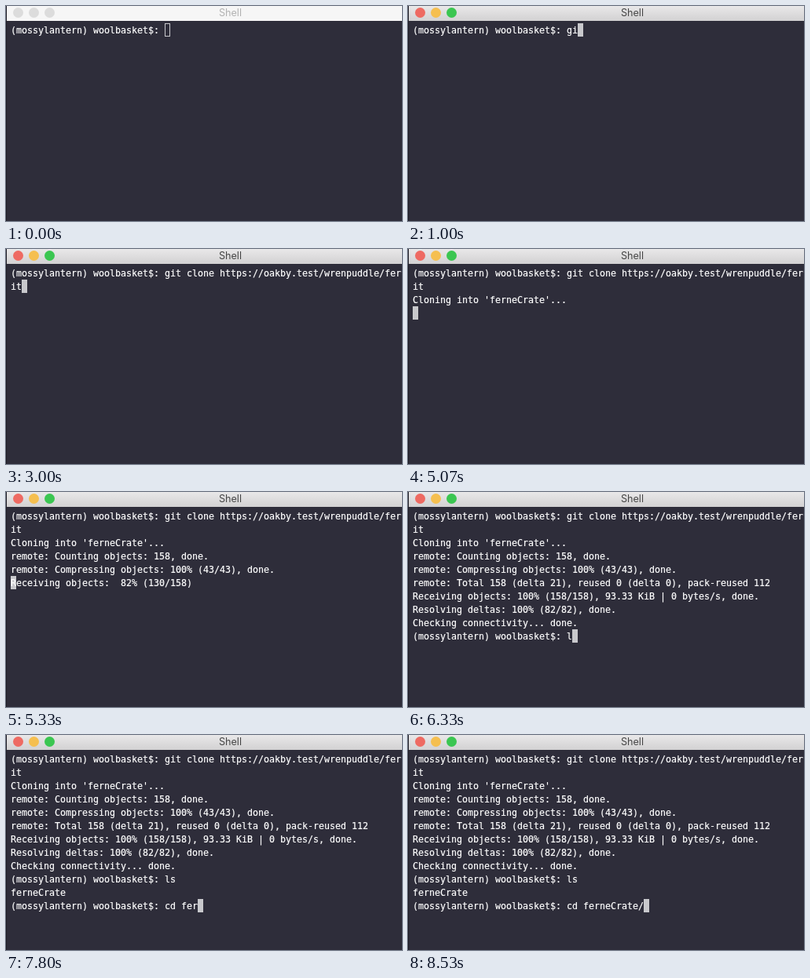
Write an HTML page that moves like this. It is 504 by 274 pixels and loops after 8590 ms.

```html
<!DOCTYPE html>
<html lang="en">
<head>
<meta charset="utf-8">
<title>Shell</title>
<style>
  html, body {
    margin: 0;
    width: 100%;
    height: 100%;
    overflow: hidden;
    background: #2e2d3a;
  }
  #window {
    position: relative;
    width: 504px;
    height: 274px;
    overflow: hidden;
    background: #2e2d3a;
  }
  #window::after {
    content: "";
    position: absolute;
    inset: 0 auto 0 0;
    width: 1px;
    background: #1c1b25;
  }
  #bar {
    position: absolute;
    inset: 0 0 auto;
    height: 19px;
    border-bottom: 1px solid #2b2a36;
    background: linear-gradient(#e9e8e9, #d2d1d2);
    color: #454545;
    font: 12.6px/17px Inter, "Liberation Sans", sans-serif;
  }
  #bar span {
    position: absolute;
    left: 271px;
    top: 0;
  }
  #bar i {
    position: absolute;
    top: 1.5px;
    width: 13px;
    height: 13px;
    border-radius: 50%;
    background: var(--c);
  }
  #screen {
    position: absolute;
    z-index: 0;
    left: 6px;
    top: 22px;
    margin: 0;
    color: #fff;
    font: 11.63px/17px "DejaVu Sans Mono", monospace;
    white-space: pre;
  }
  #text {
    position: relative;
    top: 1px;
    -webkit-text-stroke: .2px;
  }
  #cursor {
    position: absolute;
    z-index: -1;
    width: 1ch;
    height: 17px;
    box-sizing: border-box;
    background: #c8c8cc;
  }
  .idle #bar { background: #f6f6f6; color: #b2b2b2; }
  .idle #bar i { background: #dcdcdc; }
  .idle #cursor { background: none; border: 1px solid #c8c8cc; }
</style>
</head>
<body>
<div id="window" class="idle">
  <div id="bar">
    <i style="left:8.5px;--c:#ee6a62"></i>
    <i style="left:28.5px;--c:#f5bf50"></i>
    <i style="left:48.5px;--c:#3bc651"></i>
    <span>Shell</span>
  </div>
  <pre id="screen"><span id="text"></span><span id="cursor"></span></pre>
</div>
<script>
const LOOP = 8590, FOCUS = 70, ROW = 17;
const PROMPT = "(mossylantern) woolbasket$: ";
const DIR = "ferneCrate";
const states = [];
let buffer = "";

// A leading \r replaces the current line, a trailing \r sends the cursor home.
function print(at, str) {
  if (str[0] === "\r") {
    buffer = buffer.slice(0, buffer.lastIndexOf("\n") + 1);
    str = str.slice(1);
  }
  const home = str.endsWith("\r");
  buffer += home ? str.slice(0, -1) : str;
  const lines = buffer.split("\n");
  states.push({
    at,
    text: buffer,
    row: lines.length - 1,
    col: home ? 0 : lines[lines.length - 1].length
  });
}

function type(str, times) {
  times.forEach((at, i) => print(at, str[i]));
}

print(0, PROMPT);
type("git clone ", [870, 930, 1070, 1200, 1330, 1400, 1530, 1670, 1730, 1930]);
print(2130, `https://oakby.test/wrenpuddle/${DIR}.g\nit`);
print(3330, "\n");
print(4530, `Cloning into '${DIR}'...\n`);
print(5270, "remote: Counting objects: 158, done.\n" +
  "remote: Compressing objects: 100% (43/43), done.\n" +
  "Receiving objects:   0% (1/158)\r");
print(5330, "\rReceiving objects:  82% (130/158)\r");
print(5400, "\rremote: Total 158 (delta 21), reused 0 (delta 0), pack-reused 112\n" +
  "Receiving objects: 100% (158/158), 93.33 KiB | 0 bytes/s, done.\n" +
  "Resolving deltas: 100% (82/82), done.\n");
print(5530, "Checking connectivity... done.\n" + PROMPT);
type("ls", [6330, 6400]);
print(6530, `\n${DIR}\n${PROMPT}`);
print(7330, "c");
print(7470, "d ");
type(DIR, [7600, 7670, 7730, 7870, 7930, 8000, 8130, 8200]);
print(8400, DIR.slice(8) + "/");

const [win, text, cursor] = ["window", "text", "cursor"].map(id => document.getElementById(id));
const start = performance.now();
let shown;

function draw() {
  const t = Math.max(0, performance.now() - start) % LOOP;
  win.classList.toggle("idle", t < FOCUS);
  const state = states.findLast(s => s.at <= t);
  if (state !== shown) {
    shown = state;
    text.textContent = state.text;
    cursor.style.left = state.col + "ch";
    cursor.style.top = state.row * ROW + "px";
  }
  requestAnimationFrame(draw);
}
draw();
</script>
</body>
</html>
```
